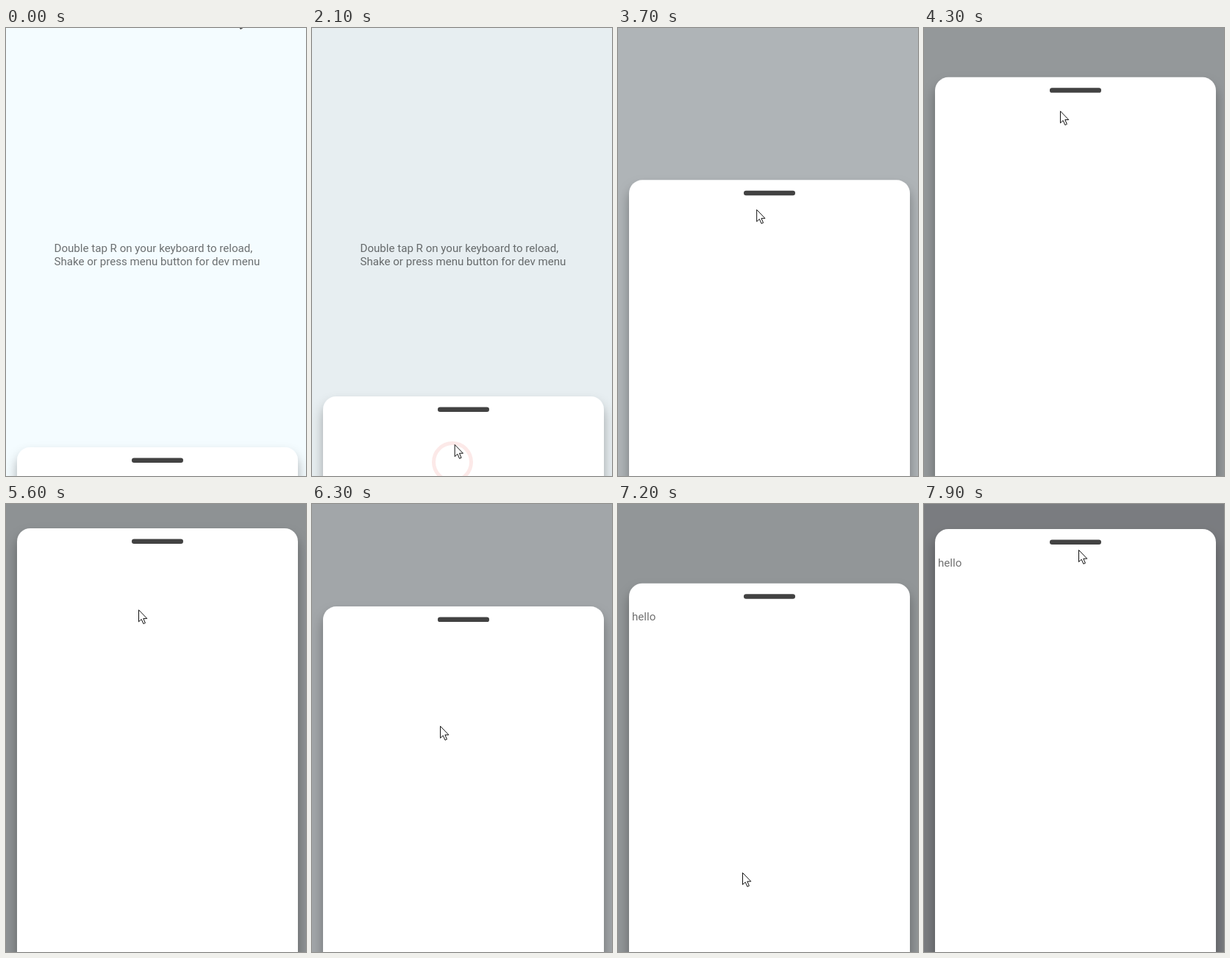
Write an HTML page that moves like this. It is 408 px wide and 608 px high and loops after 8000 ms.

```html
<!DOCTYPE html>
<html lang="en">
<head>
<meta charset="utf-8">
<title>Bottom sheet</title>
<style>
  html, body { margin: 0; width: 100%; height: 100%; overflow: hidden; background: #f4fcff; }
  svg { display: block; width: 408px; height: 608px; }
  text { font: 15.1px Roboto, sans-serif; fill: #000; fill-opacity: .56; }
</style>
</head>
<body>
<svg viewBox="0 0 408 608">
  <defs>
    <filter id="shadow" filterUnits="userSpaceOnUse" x="-30" y="-40" width="468" height="760">
      <feDropShadow dx="0" dy="10" stdDeviation="8" flood-color="#000" flood-opacity=".32"/>
    </filter>
  </defs>
  <rect width="408" height="608" fill="#f4fcff"/>
  <text x="65.5" y="304">Double tap R on your keyboard to reload,</text>
  <text x="65.5" y="322">Shake or press menu button for dev menu</text>
  <rect id="dim" width="408" height="608" fill="#040004"/>
  <g id="sheet">
    <rect x="15" width="382" height="660" rx="18" fill="#fff" filter="url(#shadow)"/>
    <rect x="171" y="14.5" width="70" height="6.5" rx="3.2" fill="#424242"/>
    <text id="hello" x="19" y="50.5">hello</text>
  </g>
  <circle id="ring" cx="191" cy="589" fill="none" stroke="#f9d4d2" stroke-width="5"/>
  <path id="cursor" d="M.5 .5V16.6L4.2 13.2 6.9 19.3 9.4 18.2 6.8 12.2H11.8Z" fill="#fff" stroke="#111"/>
</svg>
<script>
const LOOP = 8000, STEP = 100, REST = 569, OPEN = 33;
const PRESS = 1900, GRAB = 5900, RELEASE = 7050, SNAPPED = 7300;

const $ = id => document.getElementById(id);
const clamp = v => Math.max(0, Math.min(1, v));

// Distance covered at time t by a move of the given length; power bends its pace.
const move = (t, from, to, length, power = 1) =>
  length * clamp((t - from) / (to - from)) ** power;

const sheetTop = t => REST
  + move(t, PRESS, 2100, -69)
  + move(t, 2100, 4530, -489, 1.22)      // dragged up past the stop
  + move(t, 4700, 5500, 22)              // settles open
  + move(t, GRAB, RELEASE, 305)          // dragged down
  + move(t, RELEASE, SNAPPED, -313, .6)  // springs back
  + move(t, SNAPPED, 7600, 9);

const cursorX = t => 312
  + move(t, 400, 900, -74)
  + move(t, 1000, PRESS, -47)
  + move(t, PRESS, 2200, 4)
  + move(t, 3100, 5600, -15, .55)
  + move(t, 5600, 6900, -11)
  + move(t, SNAPPED, 7900, 41);

const cursorY = t => -18
  + move(t, 400, 900, 556)
  + move(t, 1000, PRESS, 51)
  + move(t, PRESS, 2100, -24)
  + move(t, 2100, 4600, -521, 1.1)
  + move(t, 4600, GRAB, 151, 1.6)
  + move(t, GRAB, RELEASE, 305)
  + move(t, SNAPPED, 7900, -438);

function draw(t) {
  const top = sheetTop(t);
  const strength = .425 + move(t, RELEASE, SNAPPED, .08);
  $('cursor').setAttribute('transform', `translate(${cursorX(t)} ${cursorY(t)})`);
  $('sheet').setAttribute('transform', `translate(0 ${top})`);
  $('dim').setAttribute('opacity', strength * clamp((REST - top) / (REST - OPEN)));
  $('hello').setAttribute('visibility', t > RELEASE ? 'visible' : 'hidden');

  const age = (t - PRESS) / 400;
  $('ring').setAttribute('r', 17 + 17 * clamp(age));
  $('ring').setAttribute('opacity', age >= 0 ? clamp(1 - age) : 0);
}

const start = performance.now();
function tick() {
  const t = (performance.now() - start) % LOOP;
  draw(Math.floor(t / STEP) * STEP);
  requestAnimationFrame(tick);
}
tick();
</script>
</body>
</html>
```
